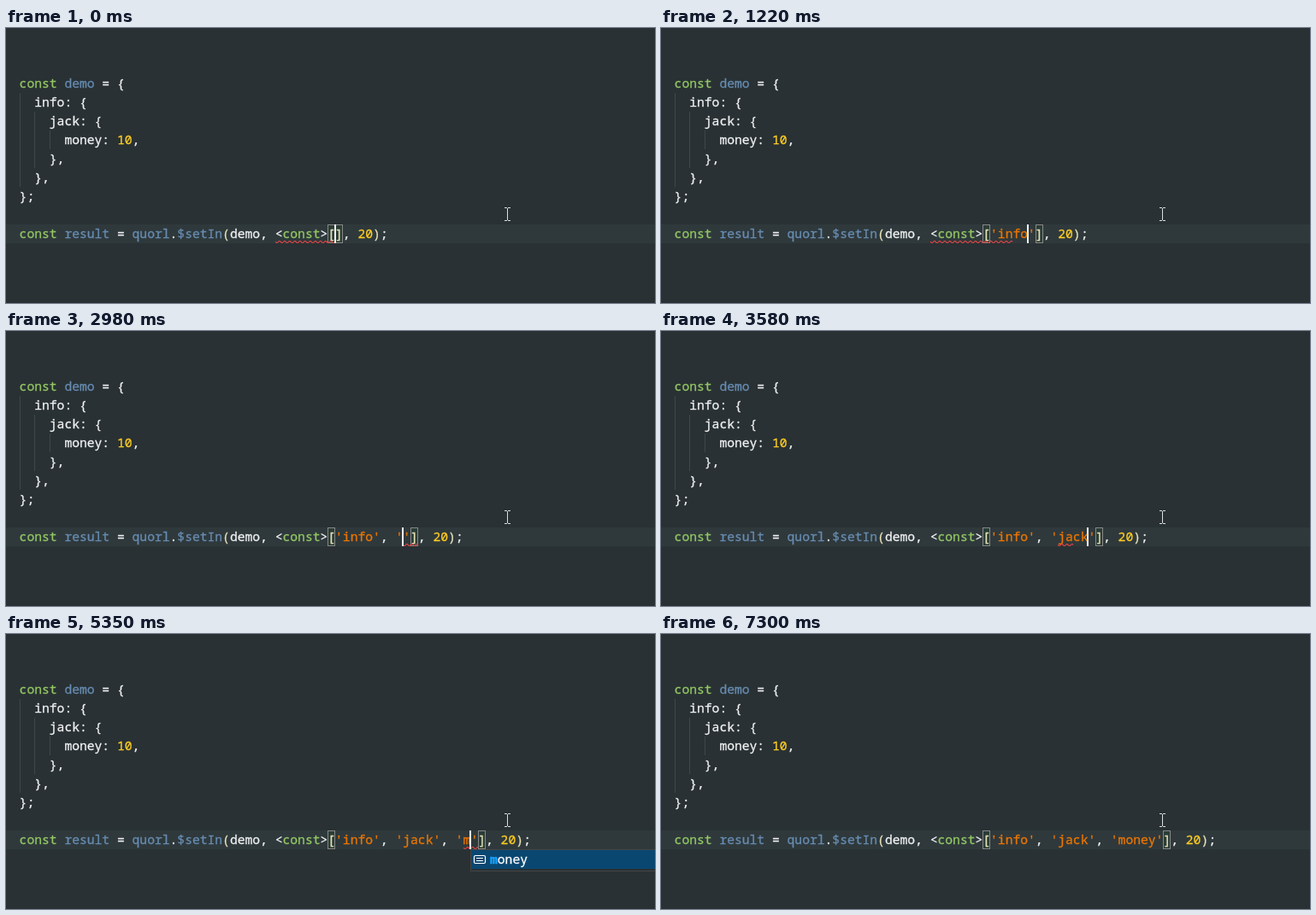
An HTML page with a canvas for the animation above (7.36 s loop, 759 by 322 pixels).

```html
<!DOCTYPE html>
<html lang="en">
<head>
<meta charset="utf-8">
<title>Typed path completion</title>
<style>
  html, body { margin: 0; width: 100%; height: 100%; overflow: hidden; background: #293134; }
  canvas { display: block; }
</style>
</head>
<body>
<canvas id="stage" width="759" height="322"></canvas>
<script>
const ctx = document.getElementById('stage').getContext('2d');
const LOOP = 7360;
const LEFT = 15.6, TOP = 54, ROW = 22, CELL = 8.797;
const LAST_Y = TOP + 8 * ROW;
const FONT = '14.66px "Noto Sans Mono", monospace';
const COLOR = {
  bg: '#293134', line: '#2f393c', guide: '#41474a',
  text: '#f1f2f3', punct: '#e8e2b7', key: '#93c763',
  name: '#678cb1', num: '#ffcd22', str: '#ec7600',
  error: '#f04545', select: '#094771', edge: '#454545', match: '#18a3ff'
};

// Each step changes part of the editor state at its time.
// code: text inside the brackets, mark: underlined columns
const STEPS = [
  [0, { code: '', caret: 42, on: true, popup: null, mark: [34, 42] }],
  [270, { code: "''", caret: 43 }],
  [340, { mark: [34, 43] }],
  [400, { popup: { col: 43, word: 'info', typed: 0 } }],
  [800, { on: false }],
  [1150, { code: "'info'", caret: 47, on: true, popup: null }],
  [1220, { mark: [34, 45] }],
  [1620, { on: false }],
  [1690, { caret: 48, on: true }],
  [2220, { on: false }],
  [2570, { code: "'info',", caret: 49, on: true }],
  [2710, { mark: null }],
  [2780, { code: "'info', ", caret: 50 }],
  [2910, { code: "'info', ''", caret: 51 }],
  [2980, { mark: [51, 53] }],
  [3120, { code: "'info', 'j'", caret: 52 }],
  [3250, { popup: { col: 52, word: 'jack', typed: 1 } }],
  [3580, { code: "'info', 'jack'", caret: 55, popup: null }],
  [3920, { on: false }],
  [3990, { caret: 56, on: true }],
  [4470, { on: false }],
  [4740, { code: "'info', 'jack',", caret: 57, on: true }],
  [4810, { mark: null }],
  [4870, { code: "'info', 'jack', ", caret: 58 }],
  [5010, { code: "'info', 'jack', ''", caret: 59 }],
  [5080, { mark: [59, 61] }],
  [5210, { code: "'info', 'jack', 'm'", caret: 60 }],
  [5350, { popup: { col: 60, word: 'money', typed: 1 } }],
  [5750, { code: "'info', 'jack', 'money'", caret: 64, popup: null }],
  [6300, { on: false }],
  [6700, { mark: null }],
  [6770, { on: true }],
  [7300, { on: false }]
];

const HEAD = [
  'const demo = {',
  '  info: {',
  '    jack: {',
  '      money: 10,',
  '    },',
  '  },',
  '};'
];

const colX = col => LEFT + col * CELL;

function stateAt(time) {
  const state = {};
  for (const [start, change] of STEPS) {
    if (start <= time) Object.assign(state, change);
  }
  return state;
}

function rect(color, x, y, w, h) {
  ctx.fillStyle = color;
  ctx.fillRect(x, y, w, h);
}

// A hairline outline gives the letters a slightly heavier weight.
function write(text, x, y, color) {
  ctx.fillStyle = ctx.strokeStyle = color;
  ctx.lineWidth = 0.3;
  [...text].forEach((ch, i) => {
    ctx.fillText(ch, x + i * CELL, y);
    ctx.strokeText(ch, x + i * CELL, y);
  });
}

function tokenColor(token, before) {
  if (token === 'const') return COLOR.key;
  if (token[0] === "'") return COLOR.str;
  if (/^\d/.test(token)) return COLOR.num;
  if (/^[()[\]]$/.test(token)) return COLOR.punct;
  if (/^\w/.test(token) && /const $|= $/.test(before)) return COLOR.name;
  if (token[0] === '$') return COLOR.name;
  return COLOR.text;
}

function codeLine(text, row) {
  for (const found of text.matchAll(/'[^']*'|[$\w]+|[^\s\w$]/g)) {
    const color = tokenColor(found[0], text.slice(0, found.index));
    write(found[0], colX(found.index), TOP + row * ROW + 16, color);
  }
}

function guides() {
  for (let depth = 0; depth < 3; depth++) {
    const y = TOP + (depth + 1) * ROW;
    rect(COLOR.guide, Math.round(colX(depth * 2)), y, 1, (5 - depth * 2) * ROW);
  }
}

function bracketBox(col) {
  const x = Math.round(colX(col));
  rect('rgba(0,100,0,.1)', x, LAST_Y, 9, ROW);
  ctx.strokeStyle = '#888';
  ctx.lineWidth = 1;
  ctx.strokeRect(x + 0.5, LAST_Y + 0.5, 8, ROW - 1);
}

function polygon(points) {
  ctx.beginPath();
  points.forEach(([x, y]) => ctx.lineTo(x, y));
  ctx.fill();
}

function squiggle([from, to]) {
  const x = Math.round(colX(from)), width = Math.round(colX(to)) - x;
  ctx.save();
  ctx.beginPath();
  ctx.rect(x, LAST_Y + ROW - 3, width, 3);
  ctx.clip();
  ctx.fillStyle = COLOR.error;
  ctx.translate(x, LAST_Y + ROW - 3);
  for (let i = 0; i < width; i += 6) {
    polygon([[5.5, 0], [2.5, 3], [1.1, 3], [4.1, 0]]);
    polygon([[4, 0], [6, 2], [6, 0.6], [5.4, 0]]);
    polygon([[0, 2], [1, 3], [2.4, 3], [0, 0.6]]);
    ctx.translate(6, 0);
  }
  ctx.restore();
}

function suggestion({ col, word, typed }) {
  const x = Math.round(colX(col)), y = LAST_Y + ROW;
  rect(COLOR.edge, x, y, 759 - x, 26);
  rect(COLOR.bg, x + 1, y + 1, 759 - x, 24);
  rect(COLOR.select, x + 1, y + 1, 759 - x, ROW);

  ctx.strokeStyle = '#fff';
  ctx.lineWidth = 1.2;
  ctx.beginPath();
  ctx.roundRect(x + 4.5, y + 7.5, 13, 9, 1.5);
  ctx.stroke();
  rect('#fff', x + 7, y + 10, 8, 1);
  rect('#fff', x + 7, y + 13, 8, 1);

  const textX = x + 23;
  ctx.font = 'bold ' + FONT;
  write(word.slice(0, typed), textX, y + 17, COLOR.match);
  ctx.font = FONT;
  write(word.slice(typed), textX + typed * CELL, y + 17, '#fff');
}

function pointer() {
  const color = '#dcdedf';
  rect(color, 586, 211, 1, 14);
  for (const y of [210, 225]) {
    rect(color, 583, y, 3, 1);
    rect(color, 587, y, 3, 1);
  }
}

function draw(time) {
  const state = stateAt(time);
  rect(COLOR.bg, 0, 0, 759, 322);
  rect(COLOR.line, 0, LAST_Y, 759, ROW);
  guides();
  bracketBox(41);
  bracketBox(42 + state.code.length);

  ctx.font = FONT;
  HEAD.forEach(codeLine);
  codeLine(`const result = quorl.$setIn(demo, <const>[${state.code}], 20);`, 8);

  if (state.mark) squiggle(state.mark);
  if (state.on) rect(COLOR.text, Math.round(colX(state.caret)) - 1, LAST_Y, 2, ROW);
  if (state.popup) suggestion(state.popup);
  pointer();
}

const begin = performance.now();
function tick() {
  draw((performance.now() - begin) % LOOP);
  requestAnimationFrame(tick);
}
tick();
</script>
</body>
</html>
```
